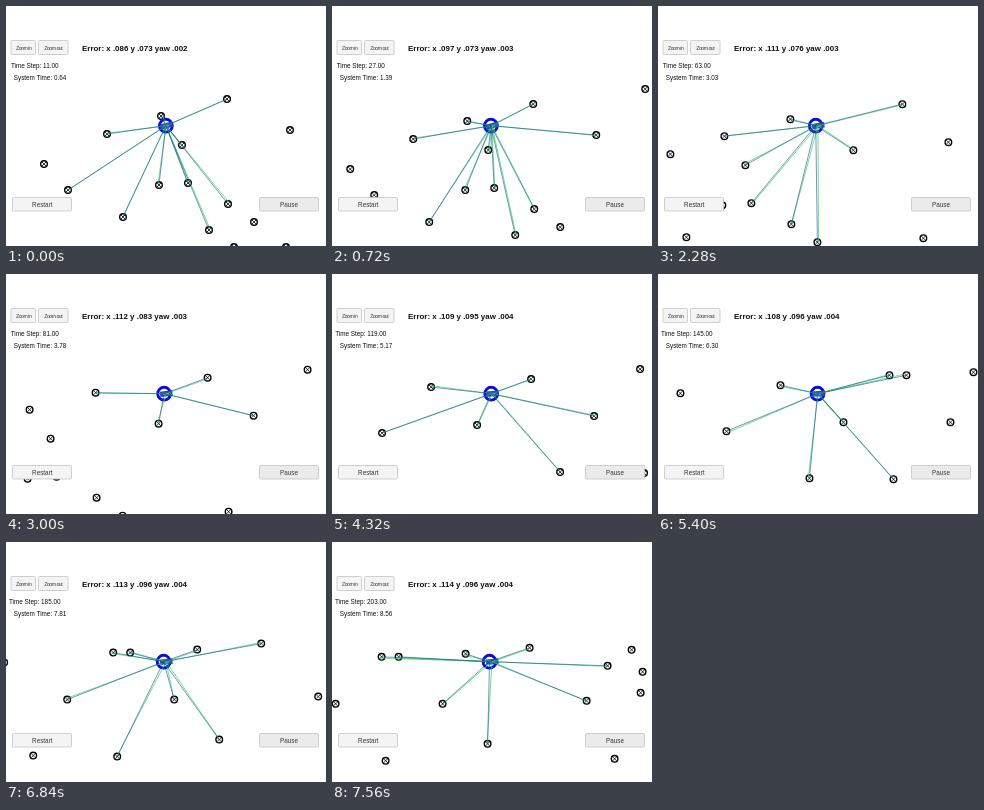
An HTML page with a canvas that plays this animation: 320x240 px, repeating every 7.68 s.

```html
<!DOCTYPE html>
<html>
<head>
<meta charset="utf-8">
<style>
  html, body { margin: 0; width: 320px; height: 240px; overflow: hidden; background: #fff; }
  canvas, svg { position: absolute; left: 0; top: 0; }
  text { font: 6.35px "Liberation Sans", Arial, sans-serif; text-anchor: middle; fill: #111; }
  .title { font-weight: bold; font-size: 7.95px; text-anchor: start; }
  .button { fill: #383838; }
  .small { font-size: 5.2px; letter-spacing: -.5px; }
  rect { fill: #f4f4f4; stroke: #c4c4c4; stroke-width: .8; }
  .pressed { fill: #ebebeb; }
</style>
</head>
<body>
<canvas id="view" width="320" height="240"></canvas>
<svg width="320" height="240">
  <rect x="5" y="34.5" width="24.5" height="14" rx="1"/>
  <rect x="32.5" y="34.5" width="29.5" height="14" rx="1"/>
  <rect x="6.5" y="191.5" width="59" height="13.5" rx="1"/>
  <rect class="pressed" x="253.5" y="191.5" width="59" height="13.5" rx="1"/>
  <text class="button small" x="17.7" y="43.7">Zoom in</text>
  <text class="button small" x="47.2" y="43.7">Zoom out</text>
  <text class="button" x="36.3" y="200.5">Restart</text>
  <text class="button" x="283" y="200.5">Pause</text>
  <text class="title" id="error" x="76" y="45.4"></text>
  <text id="step" x="28.7" y="62.3"></text>
  <text id="clock" x="34" y="74.2"></text>
</svg>
<script>
const LOOP = 7680, TICK = 120, RANGE = 122, FIRST_STEP = 11;
const car = { x: 160, y: 119.7 };
const ctx = document.getElementById('view').getContext('2d');
const label = id => document.getElementById(id);

// The simulation runs at an uneven rate: [ms, steps taken]
const pace = [[0, 0], [1560, 34], [3000, 70], [4320, 108], [5400, 134], [6120, 156], [7560, 192]];

// The map, in pixels, as seen from the starting point
const landmarks = [
  [101, 128], [155, 110], [221, 93], [284, 124], [176, 139], [38, 158], [62, 184],
  [153, 179], [182, 177], [117, 211], [222, 198], [203, 224], [248, 216], [228, 241],
  [280, 241], [333, 78], [354, 212], [379, 116], [433, 70], [496, 107], [542, 60],
  [462, 163], [546, 164], [559, 60], [626, 57], [603, 107], [690, 51], [648, 147],
  [768, 69], [747, 104], [792, 53], [803, 75], [801, 96], [775, 162]
];

function stepsAt(t) {
  const i = pace.findIndex(([end], k) => k > 0 && t <= end);
  const [[t0, n0], [t1, n1]] = [pace[i - 1], pace[i]];
  return n0 + (n1 - n0) * (t - t0) / (t1 - t0);
}

// The car speeds up towards a cruising speed while its climb flattens out
const travel = n => ({
  x: 3.38 * n - 167.8 * (1 - Math.exp(-n / 71)),
  y: .235 * n + 9.7 * (1 - Math.exp(-((n / 40) ** 2)))
});

// Filter errors settle after the start; x keeps a slow wobble
const errors = n => ({
  x: .1106 - .0215 * Math.exp(-n / 24) + .003 * Math.cos((n - 65) / 20),
  y: .0846 + .0115 * Math.tanh((n - 73) / 20),
  yaw: .0024 + .0000104 * n
});

function random(a, b) {
  const v = Math.sin(a * 12.9898 + b * 78.233) * 43758.5453;
  return v - Math.floor(v);
}

function line(x1, y1, x2, y2, color, width) {
  ctx.strokeStyle = color;
  ctx.lineWidth = width;
  ctx.beginPath();
  ctx.moveTo(x1, y1);
  ctx.lineTo(x2, y2);
  ctx.stroke();
}

function ring(x, y, r, color, width) {
  ctx.strokeStyle = color;
  ctx.lineWidth = width;
  ctx.beginPath();
  ctx.arc(x, y, r, 0, 2 * Math.PI);
  ctx.stroke();
}

function drawLandmark(x, y) {
  ring(x, y, 3.3, '#000', 1.4);
  line(x - 2, y - 2, x + 2, y + 2, '#000', .8);
  line(x - 2, y + 2, x + 2, y - 2, '#000', .8);
}

function drawCar(heading) {
  ctx.save();
  ctx.translate(car.x, car.y);
  ctx.rotate(heading);
  ctx.fillStyle = '#2a4cae';
  ctx.fillRect(-6, -2.7, 12.5, 5.4);
  ctx.fillStyle = '#7fa3b5';
  ctx.fillRect(-3, -1, 6, 2);
  ctx.restore();
}

const decimals = v => v.toFixed(3).slice(1);

function draw(time) {
  const tick = Math.floor(time / TICK), t = tick * TICK;
  const n = stepsAt(t), here = travel(n), next = travel(n + 1);
  const speed = next.x - here.x;
  // The estimate trails the car by up to one step
  const guess = car.x - speed * random(tick, 7);
  const points = landmarks.map(([x, y]) => [x - here.x, y + here.y]);

  ctx.clearRect(0, 0, 320, 240);
  points.forEach(([x, y]) => drawLandmark(x, y));
  ring(guess, car.y, 6.4, '#0c0cdc', 2.9);
  drawCar(-Math.atan2(next.y - here.y, speed));
  points.forEach(([x, y], i) => {
    if (Math.hypot(x - car.x, y - car.y) > RANGE) return;
    const noise = k => 3 * random(i + k, tick) - 1.5;
    line(car.x, car.y, x + noise(0), y + noise(50), '#30dc50', .7);
    line(guess, car.y, x, y, 'rgba(16,60,165,.8)', .7);
  });

  const e = errors(n);
  label('error').textContent = `Error: x ${decimals(e.x)} y ${decimals(e.y)} yaw ${decimals(e.yaw)}`;
  label('step').textContent = `Time Step: ${Math.round(FIRST_STEP + n)}.00`;
  label('clock').textContent = `System Time: ${(.64 + 1.048 * t / 1000).toFixed(2)}`;
}

const start = performance.now();
function loop() {
  draw((performance.now() - start) % LOOP);
  requestAnimationFrame(loop);
}
loop();
</script>
</body>
</html>
```
